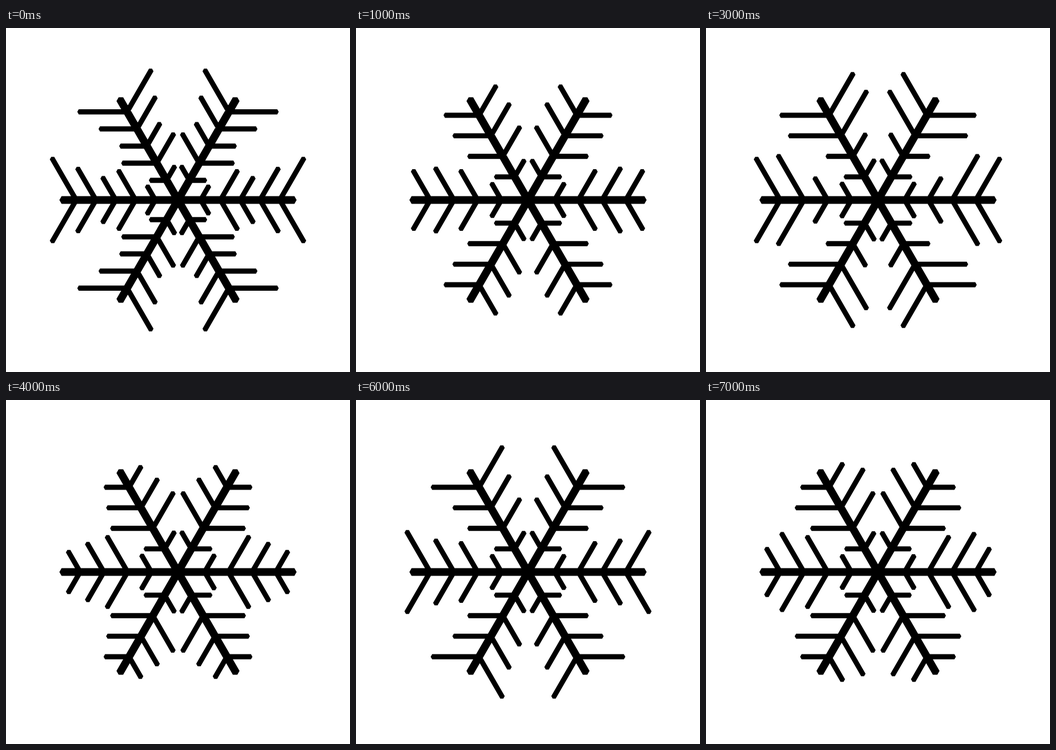
These frames come from a looping animation (580x580 px, 8000 ms). An HTML page:

```html
<!DOCTYPE html>
<html lang="en">
<head>
<meta charset="utf-8">
<title>Snowflakes</title>
<style>
html, body { margin: 0; width: 100%; height: 100%; overflow: hidden; background: #fff; }
svg { display: block; width: 100vw; height: 100vh; }
</style>
</head>
<body>
<svg viewBox="0 0 580 580"><path id="flake" fill="#000"/></svg>
<script>
const CENTER = 290, ARM = 192.5, SPAN = 200, OFFSET = 5;
const ARM_R = 7.5, TWIG_R = 5, HOLD = 1000;

// Twig lengths from the center outwards; the twigs share the arm evenly.
const flakes = [
  [25, 55, 41.7, 59.8, 79],
  [30, 55, 60, 55],
  [40, 49, 84.5],
  [30.6, 41, 84.5, 79],
  [30.6, 67, 53.7, 38],
  [25, 55, 44.5, 54.6, 85],
  [30, 55, 60, 76.6],
  [29.5, 67, 73, 43.8]
];

const polar = (x, y, dist, deg) => {
  const a = deg * Math.PI / 180;
  return [x + dist * Math.cos(a), y + dist * Math.sin(a)];
};

// A bar whose ends are halves of a hexagon with circumradius r.
function bar(x, y, len, deg, r) {
  const [ex, ey] = polar(x, y, len, deg);
  const start = [120, 180, 240].map(a => polar(x, y, r, deg + a));
  const end = [300, 0, 60].map(a => polar(ex, ey, r, deg + a));
  return "M" + [...start, ...end].map(p => p.map(v => v.toFixed(2)).join(" ")).join("L") + "Z";
}

function flakePath(lengths) {
  const step = SPAN / (lengths.length + 1);
  let d = "";
  for (let deg = 0; deg < 360; deg += 60) {
    d += bar(CENTER, CENTER, ARM, deg, ARM_R);
    lengths.forEach((len, i) => {
      const [x, y] = polar(CENTER, CENTER, step * (i + 1) + OFFSET, deg);
      d += bar(x, y, len, deg - 60, TWIG_R) + bar(x, y, len, deg + 60, TWIG_R);
    });
  }
  return d;
}

const paths = flakes.map(flakePath);
const flake = document.getElementById("flake");
let shown = -1;

function draw(ms) {
  const i = Math.floor(ms / HOLD) % paths.length;
  if (i !== shown) flake.setAttribute("d", paths[shown = i]);
}

const t0 = performance.now();
function tick() {
  draw(performance.now() - t0);
  requestAnimationFrame(tick);
}
tick();
</script>
</body>
</html>
```
